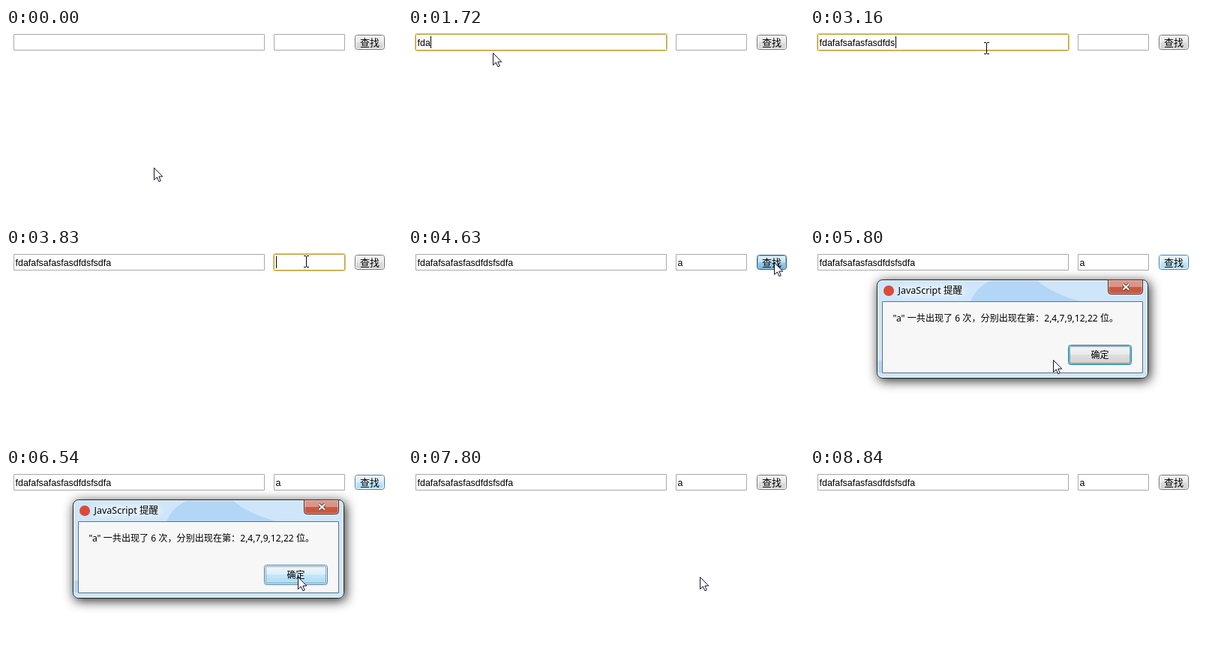
An HTML page with a canvas for the animation above (9.44 s loop, 528 px wide and 256 px high).

```html
<!DOCTYPE html>
<html lang="zh-CN">
<head>
<meta charset="utf-8">
<style>
html, body { margin: 0; width: 100%; height: 100%; overflow: hidden; background: #fff; }
canvas { display: block; }
</style>
</head>
<body>
<canvas id="stage" width="528" height="256"></canvas>
<script>
const ctx = document.getElementById('stage').getContext('2d');
const LOOP = 9440, STEP = 60, TYPED = 'fdafafsafasfasdfdsfsdfa';
const LATIN = '12.4px "Liberation Sans", Arial, sans-serif';
const CJK = '"Noto Sans", "Noto Sans CJK SC", sans-serif';
const field1 = [10, 8, 335, 22], field2 = [357, 8, 95, 22];
const findBtn = [465, 9, 40, 20], okBtn = [344, 129, 85, 27];
const arrow = new Path2D('M0 0V16L3.8 12.5L6.4 18.2L8.8 17.2L6.3 11.6H11.3Z');

// Button looks: border, inner edge, top and bottom of the gradient.
const looks = {
  normal: ['#707070', '#fbfbfb', '#eee', '#cfcfcf'],
  focus: ['#2f7f9f', '#48d1f4', '#eee', '#cfcfcf'],
  hover: ['#3c7fb1', '#f4fbff', '#e2f3fd', '#a7d9f5'],
  pressed: ['#2c628b', '#9db6c5', '#d8eefa', '#68b3db']
};

const inside = ([x, y], [l, t, w, h]) => x >= l && x <= l + w && y >= t && y <= t + h;

// Where the pointer is: each leg bends towards an optional control point.
function pointerAt(t) {
  let pos = [198, 187];
  const leg = (start, steps, end, bend) => {
    if (t < start) return;
    const u = Math.min(1, (Math.floor((t - start) / STEP) + 1) / steps);
    pos = pos.map((from, i) => {
      const via = bend ? bend[i] : (from + end[i]) / 2;
      return from * (1 - u) ** 2 + 2 * via * u * (1 - u) + end[i] * u * u;
    });
  };
  leg(460, 6, [110, 18]);
  leg(1020, 4, [114, 34]);
  leg(2860, 6, [235, 27]);
  leg(3220, 4, [288, 31]);
  leg(3460, 5, [400, 18]);
  leg(4150, 7, [489, 20]);
  leg(5080, 3, [433, 87]);
  leg(5260, 13, [385, 153], [208, 155]);
  leg(6040, 2, [390, 151]);
  leg(6360, 4, [390, 146]);
  leg(8000, 15, [60, 258], [-58, -190]);
  return pos.map(Math.round);
}

// Letters typed so far in a burst of n.
function burst(t, start, end, n, power) {
  if (t < start) return 0;
  const u = Math.min(1, (t - start) / (end - start));
  return 1 + Math.round(u ** power * (n - 1));
}

function rounded(x, y, w, h, r, fill, stroke) {
  ctx.beginPath();
  ctx.roundRect(x, y, w, h, r);
  if (fill) { ctx.fillStyle = fill; ctx.fill(); }
  if (stroke) { ctx.strokeStyle = stroke; ctx.stroke(); }
}

// Vertical gradient with a brighter, glossy upper half.
function glossy(x, y, w, h, r, top, bottom, border) {
  const g = ctx.createLinearGradient(0, y, 0, y + h);
  g.addColorStop(0, top);
  g.addColorStop(1, bottom);
  rounded(x + 0.5, y + 0.5, w - 1, h - 1, r, g);
  ctx.fillStyle = 'rgba(255,255,255,.35)';
  ctx.fillRect(x + 1, y + 1, w - 2, Math.floor(h / 2) - 1);
  rounded(x + 0.5, y + 0.5, w - 1, h - 1, r, null, border);
}

function label(text, x, y, font, align = 'left') {
  ctx.font = font;
  ctx.textAlign = align;
  ctx.fillStyle = '#000';
  ctx.fillText(text, x, y);
}

function drawField([x, y, w, h], text, focused, caret) {
  if (focused) {
    rounded(x - 0.5, y - 0.5, w + 1, h + 1, 2, '#fff', '#d9c374');
    rounded(x + 0.5, y + 0.5, w - 1, h - 1, 1, null, '#c2a145');
  } else {
    rounded(x + 0.5, y + 0.5, w - 1, h - 1, 0, '#fff', '#a9a9a9');
  }
  label(text, x + 2.6, y + 16, LATIN);
  if (focused && caret) {
    ctx.fillRect(x + 3 + Math.round(ctx.measureText(text).width), y + 3, 1, 16);
  }
}

function drawButton([x, y, w, h], text, size, look) {
  const [border, edge, top, bottom] = looks[look];
  glossy(x, y, w, h, 3, top, bottom, border);
  rounded(x + 1.5, y + 1.5, w - 3, h - 3, 2, null, edge);
  label(text, x + w / 2, y + h / 2 + size * 0.38, size + 'px ' + CJK, 'center');
}

function drawDialog(look) {
  ctx.save();
  ctx.shadowColor = 'rgba(0,0,0,.85)';
  ctx.shadowBlur = 15;
  ctx.shadowOffsetX = 2;
  ctx.shadowOffsetY = 3;
  rounded(89, 42, 362, 132, 7, '#cfe6fa');
  ctx.restore();

  // Darker sweep across the glass
  ctx.fillStyle = '#b3d6f7';
  ctx.beginPath();
  ctx.moveTo(214, 71);
  ctx.quadraticCurveTo(222, 52, 242, 43);
  ctx.lineTo(302, 43);
  ctx.quadraticCurveTo(325, 62, 361, 71);
  ctx.fill();
  ctx.fillRect(91, 150, 6, 16);
  rounded(90.5, 43.5, 359, 129, 6, null, 'rgba(255,255,255,.75)');
  rounded(89.5, 42.5, 361, 131, 7, null, '#1c242c');
  rounded(96.5, 71.5, 347, 95, 0, '#f7f7f7', '#5f7180');

  ctx.save();
  ctx.filter = 'blur(4px)';
  rounded(116, 51, 90, 12, 6, 'rgba(255,255,255,.6)');
  ctx.restore();
  label('JavaScript 提醒', 117.5, 61, '12.5px ' + CJK);
  ctx.fillStyle = '#dc4a38';
  ctx.beginPath();
  ctx.arc(105, 57, 7, 0, 7);
  ctx.fill();

  // Close button
  glossy(397, 42, 47, 20, [0, 0, 4, 4], '#c4604c', '#c8553c', '#5a2a25');
  rounded(398.5, 43.5, 44, 17, [0, 0, 3, 3], null, 'rgba(255,255,255,.4)');
  for (const [color, width] of [['#5b3a3a', 4], ['#fff', 2.2]]) {
    ctx.strokeStyle = color;
    ctx.lineWidth = width;
    ctx.stroke(new Path2D('M417.5 48.5l7.5 7M425 48.5l-7.5 7'));
  }
  ctx.lineWidth = 1;

  label('"a" 一共出现了 6 次，分别出现在第：2,4,7,9,12,22 位。', 110.5, 98, '12.1px ' + CJK);
  drawButton(okBtn, '确定', 12, look);
  ctx.setLineDash([1, 1]);
  ctx.strokeStyle = '#555';
  ctx.strokeRect(346.5, 131.5, 80, 22);
  ctx.setLineDash([]);
}

function drawPointer([x, y], beam) {
  ctx.save();
  ctx.translate(x, y);
  if (beam) {
    ctx.fillStyle = '#000';
    ctx.fillRect(0, -7, 1, 14);
    for (const side of [-8, 7]) {
      ctx.fillRect(-3, side, 3, 1);
      ctx.fillRect(1, side, 3, 1);
    }
  } else {
    ctx.translate(-0.5, -0.5);
    ctx.fillStyle = '#fff';
    ctx.strokeStyle = '#10102a';
    ctx.fill(arrow);
    ctx.stroke(arrow);
  }
  ctx.restore();
}

function draw(t) {
  ctx.fillStyle = '#fff';
  ctx.fillRect(0, 0, 528, 256);
  const pos = pointerAt(t);
  const open = t >= 4820 && t < 7800;
  const count = burst(t, 1530, 2300, 9, 1) + burst(t, 2500, 3400, 14, 1.5);
  const caret = t < 1330 || t >= 1530;

  drawField(field1, TYPED.slice(0, count), t >= 820 && t < 3830, caret);
  drawField(field2, t >= 4090 ? 'a' : '', t >= 3830 && t < 4630, true);
  const findLook = t >= 4630 && t < 4760 ? 'pressed'
    : open || inside(pos, findBtn) ? 'hover' : 'normal';
  drawButton(findBtn, '查找', 13, findLook);

  if (open) {
    drawDialog(t >= 7600 ? 'pressed' : inside(pos, okBtn) ? 'hover' : 'focus');
  }
  drawPointer(pos, !open && (inside(pos, field1) || inside(pos, field2)));
}

function frame() {
  draw(performance.now() % LOOP);
  requestAnimationFrame(frame);
}
frame();
</script>
</body>
</html>
```
